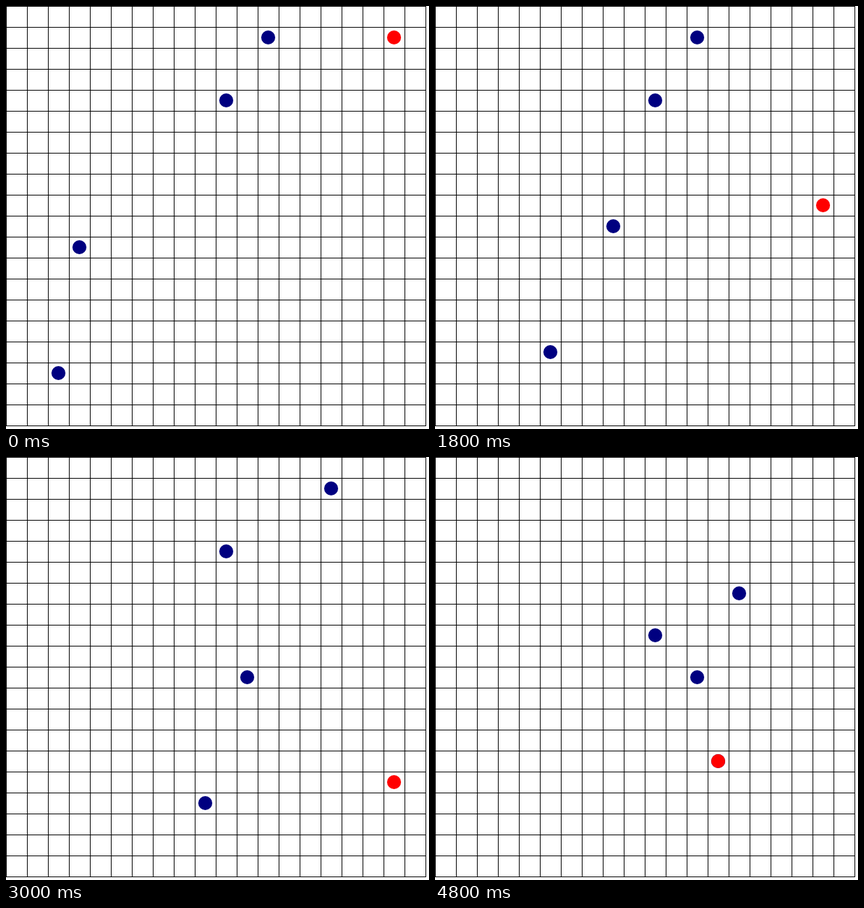
Write an HTML page with a canvas that moves like this. It is 605 px wide and 605 px high and loops after 5100 ms.

```html
<!DOCTYPE html>
<html lang="en">
<head>
<meta charset="utf-8">
<title>Grid chase</title>
<style>
  html, body { margin: 0; width: 100%; height: 100%; overflow: hidden; background: #fff; }
  canvas { display: block; }
</style>
</head>
<body>
<canvas width="605" height="605"></canvas>
<script>
const CELL = 30, CELLS = 20, SIZE = CELL * CELLS + 1;
const STEP = 300, STEPS = 17;
const ctx = document.querySelector('canvas').getContext('2d');

function drawGrid() {
  ctx.fillStyle = '#000';
  for (let p = 0; p < SIZE; p += CELL) {
    ctx.fillRect(p, 0, 1, SIZE);
    ctx.fillRect(0, p, SIZE, 1);
  }
}

function dot(column, row, color = '#000080') {
  ctx.fillStyle = color;
  ctx.beginPath();
  ctx.arc((column + 0.5) * CELL, (row + 0.5) * CELL, 10, 0, 2 * Math.PI);
  ctx.fill();
}

function draw(time) {
  const step = Math.floor(time / STEP) % STEPS;
  // Cells walked so far by a dot that moves one cell per step between two steps.
  const walk = (from, to = STEPS) => Math.min(Math.max(step - from, 0), to - from);

  ctx.clearRect(0, 0, 605, 605);
  drawGrid();

  // Chasers
  dot(12 + walk(6, 7) + walk(8, 10) - walk(15), 1 + walk(10, 15));
  dot(10, 4 + walk(12));
  dot(3 + walk(1, 9) + walk(13, 14), 11 - walk(0, 1));
  dot(2 + walk(3, 14), 17 + walk(0, 1) - walk(1, 3) - walk(14));

  // The runner sometimes dashes two cells in one step.
  const dashes = walk(0, 1) + walk(5, 6) + walk(7, 9);
  dot(18 - walk(12) - walk(12, 13), 1 + walk(0, 12) + dashes - walk(13), '#f00');
}

const start = performance.now();
function tick() {
  draw(performance.now() - start);
  requestAnimationFrame(tick);
}
tick();
</script>
</body>
</html>
```
